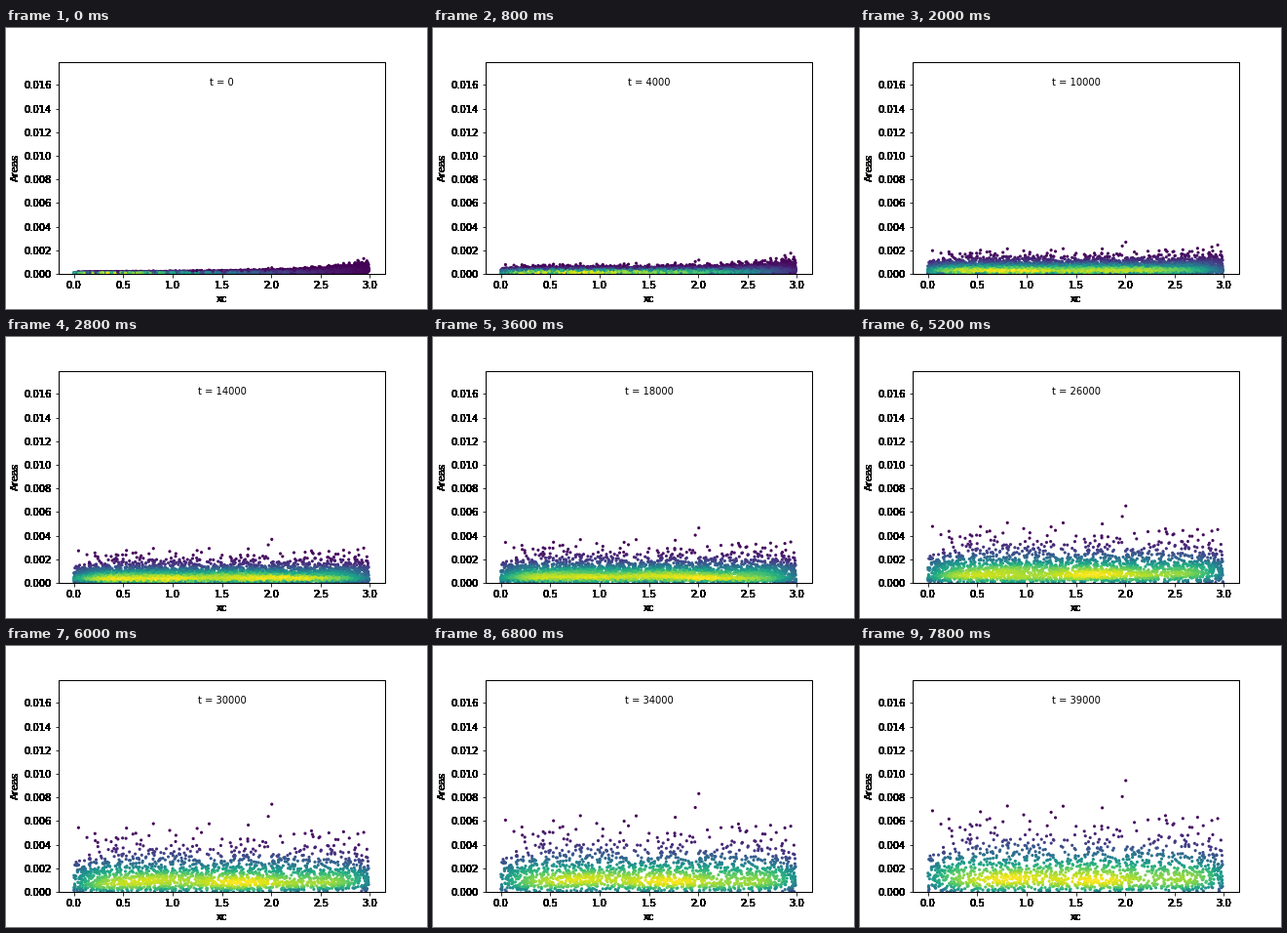
Write a matplotlib script that moves like this. It is 432 by 288 pixels and loops after 8000 ms.

```python
import math

import matplotlib.pyplot as plt
import numpy as np
from matplotlib.animation import FuncAnimation
from matplotlib.axes import Axes

FRAMES, INTERVAL = 40, 200
WIDTH = 3.2          # x where the initial mean area would diverge
RIGHT = 2.99         # last cell centre
TILT = 0.85
M_START = 6e-5       # initial mean area at the left wall
GROWTH = 4.87e-5     # mean area gained per 1000 time units
PASSES = 40          # label overdraws


class HeavyAxes(Axes):
    """Axes whose frame and labels are drawn many times over."""

    def draw(self, renderer):
        super().draw(renderer)
        parts = [*self.spines.values(), self.xaxis.label, self.yaxis.label,
                 *self.get_xticklabels(), *self.get_yticklabels()]
        for _ in range(PASSES):
            for part in parts:
                part.draw(renderer)


def make_cells():
    """Fixed position and survival rank of each cell, denser to the left."""
    rng = np.random.default_rng(12)
    q = TILT + 1
    end = (1 - RIGHT / WIDTH) ** q
    count = int(WIDTH / (q * M_START) * (1 - end))
    u = (np.arange(count) + rng.random(count)) / count
    x = WIDTH * (1 - (1 - u * (1 - end)) ** (1 / q))
    rank = -np.log((rng.permutation(count) + 0.5) / count)
    order = rng.permutation(count)
    return x[order], rank[order]


def areas(x, rank, k):
    """Areas at time 1000 k: the mean grows, low ranks shrink to zero."""
    start = M_START * (1 - x / WIDTH) ** -TILT
    mean = np.hypot(start, GROWTH * k)
    p = 0.71 - 0.21 * math.exp(-k / 4)
    gap = np.minimum(x, RIGHT - x).clip(0)
    wall = 1 - 0.4 * np.exp(-gap / 0.04)
    level = np.maximum(rank + np.log(start / mean), 0)
    return wall * mean / math.gamma(1 + p) * level ** p


def smoother(edges, width):
    mid = (edges[1:] + edges[:-1]) / 2
    return np.exp(-0.5 * ((mid[:, None] - mid) / width) ** 2)


def density(x, a):
    """Gaussian kernel density at each point, on a fine grid."""
    factor = len(x) ** (-1 / 6)
    ex = np.linspace(0, 3, 121)
    ea = np.linspace(0, a.max() * 1.001, 301)
    grid = np.histogram2d(x, a, bins=(ex, ea))[0]
    grid = smoother(ex, factor * x.std()) @ grid @ smoother(ea, factor * a.std())
    i = np.clip(np.digitize(x, ex) - 1, 0, 119)
    j = np.clip(np.digitize(a, ea) - 1, 0, 299)
    return grid[i, j]


plt.rcParams["font.family"] = "DejaVu Sans"
fig = plt.figure(figsize=(6, 4), dpi=72, facecolor="white")
ax = fig.add_axes(HeavyAxes(fig, [0.125, 0.125, 0.775, 0.755]))
ax.set(xlim=(-0.1535, 3.1515), ylim=(0, 0.01797), xlabel="xc", ylabel="Areas",
       xticks=np.arange(0, 3.1, 0.5), yticks=np.arange(9) * 0.002)

cell_x, cell_rank = make_cells()
dots = ax.scatter([], [], s=10, c=[], cmap="viridis", linewidths=0)
clock = ax.text(1.5, 0.01595, "", ha="center", fontsize=10, zorder=5)


def draw(k):
    a = areas(cell_x, cell_rank, k)
    alive = a > 0
    x, a = cell_x[alive], a[alive]
    z = density(x, a)
    dots.set_offsets(np.column_stack((x, a)))
    dots.set_array(z)
    dots.set_clim(z.min(), z.max())
    clock.set_text(f"t = {1000 * k}")
    return dots, clock


anim = FuncAnimation(fig, draw, frames=FRAMES, interval=INTERVAL,
                     repeat=True, repeat_delay=0, blit=False)
plt.show()
```
